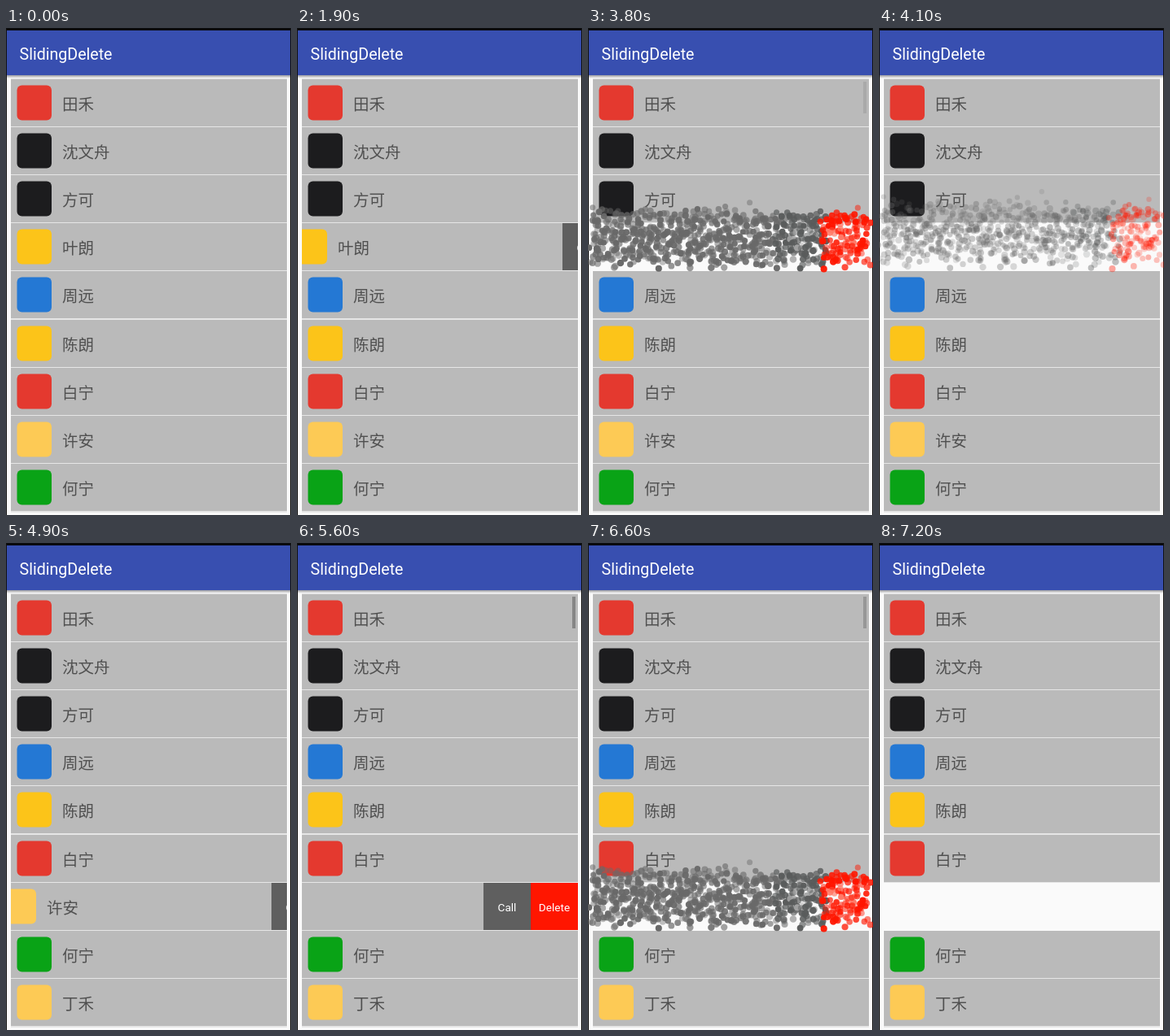
An HTML page with a canvas for the animation above (7.3 s loop, 350x599 px).

```html
<!DOCTYPE html>
<html lang="zh">
<head>
<meta charset="utf-8">
<style>
  html, body { margin: 0; width: 100%; height: 100%; overflow: hidden; background: #fafafa; }
  canvas { display: block; }
</style>
</head>
<body>
<canvas id="stage" width="350" height="599"></canvas>
<script>
const ctx = document.getElementById('stage').getContext('2d');
const LOOP = 7300, STEP = 100;
const LEFT = 6, RIGHT = 345, TOP = 63, PITCH = 59.2, ROW_H = 58;
const BUTTON_W = 58, OPEN = 2 * BUTTON_W;
const RED = '#e4392f', BLACK = '#1c1c1e', YELLOW = '#fcc419',
      BLUE = '#2478d4', AMBER = '#fdca55', GREEN = '#09a316';

const contacts = [
  ['田禾', RED], ['沈文舟', BLACK], ['方可', BLACK], ['叶朗', YELLOW], ['周远', BLUE],
  ['陈朗', YELLOW], ['白宁', RED], ['许安', AMBER], ['何宁', GREEN], ['丁禾', AMBER],
].map(([name, color]) => ({ name, color }));

// Each removal: contact, start of swipe, start of burst, row collapse
const removals = [
  { contact: contacts[3], swipe: 1900, burst: 3200, end: 4400 },
  { contact: contacts[7], swipe: 4900, burst: 6000, end: LOOP },
];

const clamp = v => Math.max(0, Math.min(1, v));
const random = n => {
  const v = Math.sin(n * 127.1 + 11.7) * 43758.5453;
  return v - Math.floor(v);
};
const rowTop = i => Math.floor(TOP + PITCH * i);

function rect(x, y, w, h, color) {
  ctx.fillStyle = color;
  ctx.fillRect(x, y, w, h);
}

function text(str, x, y, font, color = '#fff', align = 'left') {
  ctx.font = font;
  ctx.fillStyle = color;
  ctx.textAlign = align;
  ctx.fillText(str, x, y);
}

function drawButton(label, x, y, color) {
  rect(x, y, BUTTON_W, ROW_H, color);
  text(label, x + BUTTON_W / 2, y + 34.5, '13.6px Roboto, sans-serif', '#fff', 'center');
}

function drawRow({ name, color }, y, shift) {
  ctx.save();
  ctx.beginPath();
  ctx.rect(LEFT, y, RIGHT - LEFT, ROW_H);
  ctx.clip();
  rect(LEFT, y, RIGHT - LEFT, ROW_H, '#bababa');
  ctx.fillStyle = color;
  ctx.beginPath();
  ctx.roundRect(13.5 - shift, y + 7.5, 42.5, 43, 6);
  ctx.fill();
  text(name, 69 - shift, y + 37.5, '19.5px "Noto Sans CJK SC", "Noto Sans CJK", sans-serif', '#505050');
  if (shift) {
    drawButton('Call', RIGHT - shift, y, '#5f5f5f');
    drawButton('Delete', RIGHT - shift + BUTTON_W, y, '#ff1600');
  }
  ctx.restore();
}

function dotColor(x, dy) {
  const onText = dy > 24 && dy < 34;
  if (x > 287) return onText && x > 298 && x < 334 ? '#ff7a68' : '#ff1600';
  if (x > 231) return onText && x > 248 && x < 266 ? '#a5a5a5' : '#5a5c5c';
  return '#696969';
}

function drawBurst(y, age) {
  let seed = 0;
  for (let dx = 0; dx < RIGHT - LEFT; dx += 5) {
    for (let dy = 2; dy < ROW_H; dy += 5) {
      const [a, b, c, d] = [1, 2, 3, 4].map(() => random(++seed));
      ctx.globalAlpha = clamp((1 - age) * (0.9 + 1.3 * a));
      ctx.fillStyle = dotColor(LEFT + dx, dy);
      ctx.beginPath();
      ctx.arc(LEFT + dx + (b - 0.5) * 24 * age,
              y + dy - age * (34 * c + 20 * d ** 4),
              4.3 - 1.4 * age * d, 0, Math.PI * 2);
      ctx.fill();
    }
  }
  ctx.globalAlpha = 1;
}

function drawFrame() {
  rect(0, 0, 350, 599, '#fafafa');
  rect(1, 3, 348, 55, '#384fb0');
  const shadow = ctx.createLinearGradient(0, 58, 0, 62);
  shadow.addColorStop(0, '#9a9a9f');
  shadow.addColorStop(1, '#fafafa');
  rect(1, 58, 348, 4, shadow);
  rect(0, 0, 350, 3, '#0a0a0a');
  rect(0, 0, 1, 599, '#111');
  rect(349, 0, 1, 599, '#111');
  text('SlidingDelete', 16.5, 38.5, '19.6px Roboto, sans-serif');
}

function drawScrollbar(t) {
  const visible = (from, to) => t < from ? 0 : clamp((to - t) / 300);
  ctx.globalAlpha = Math.max(visible(2600, 3900), visible(5600, 6800));
  rect(338, 66, 4, 39, '#868686');
  ctx.globalAlpha = 1;
}

function render(t) {
  drawFrame();
  rect(LEFT, TOP - 1, RIGHT - LEFT, 534, '#e6e6e6');
  const gone = removals.filter(r => t >= r.end).map(r => r.contact);
  let burst = null;
  contacts.filter(c => !gone.includes(c)).slice(0, 9).forEach((contact, i) => {
    const y = rowTop(i);
    const removal = removals.find(r => r.contact === contact);
    if (removal && t >= removal.burst) {
      rect(LEFT, y, RIGHT - LEFT, ROW_H + 1, '#fafafa');
      burst = { y, age: (t - removal.burst) / 1100 };
      return;
    }
    const shift = removal && t >= removal.swipe
      ? Math.min(OPEN, 19.4 * ((t - removal.swipe) / STEP + 1)) : 0;
    drawRow(contact, y, Math.round(shift));
  });
  drawScrollbar(t);
  if (burst && burst.age < 1) drawBurst(burst.y, burst.age);
}

function tick() {
  render(Math.floor(performance.now() % LOOP / STEP) * STEP);
  requestAnimationFrame(tick);
}
tick();
</script>
</body>
</html>
```
